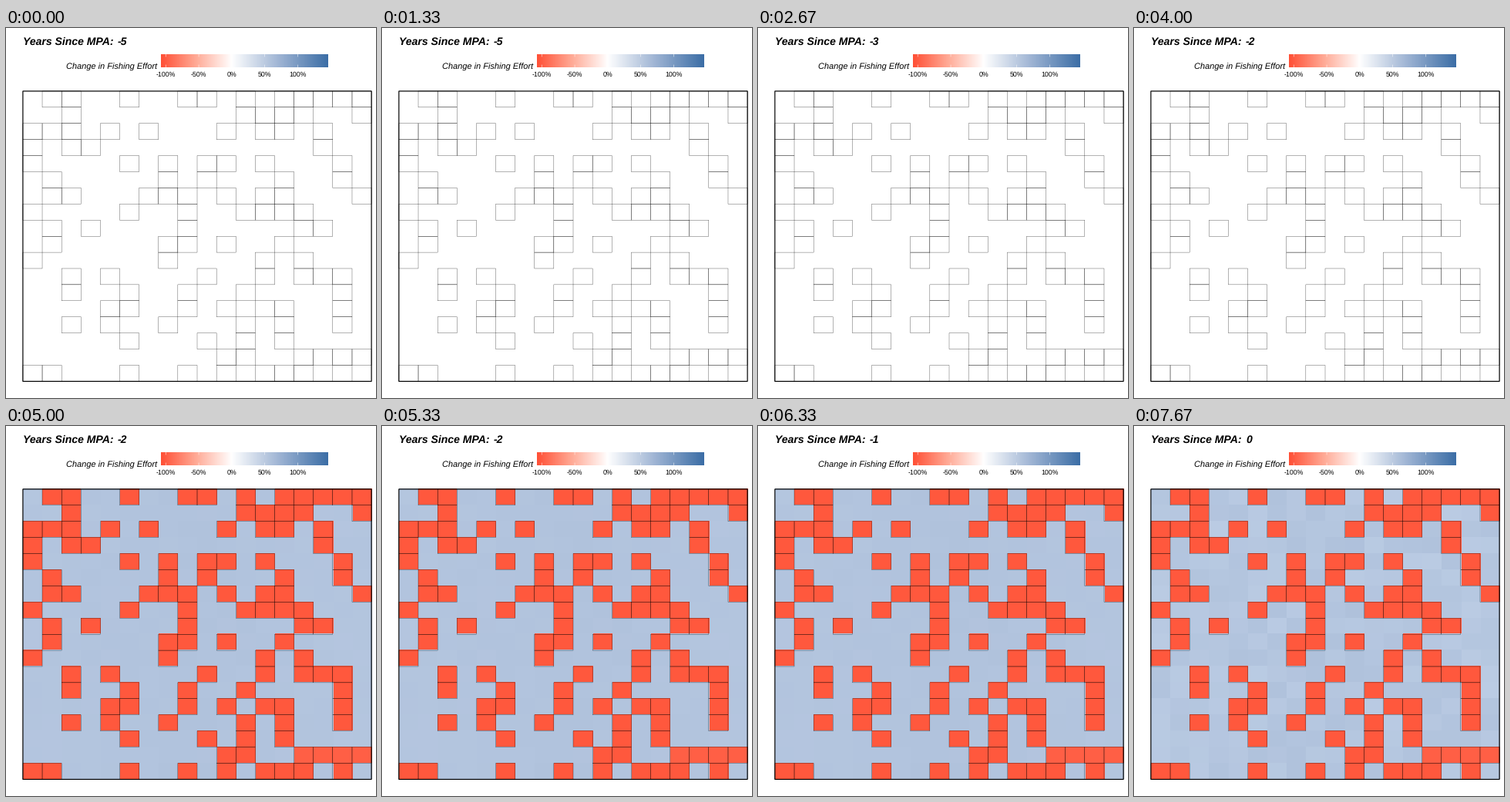
Animation of 480 by 480 pixels, one loop 8000 ms. Source, as a matplotlib script:

```python
import matplotlib.pyplot as plt
import numpy as np
from matplotlib.animation import FuncAnimation
from matplotlib.colors import LinearSegmentedColormap
from matplotlib.patches import Rectangle

SIZE, DPI = 480, 72
N = 18
LEFT, RIGHT, TOP, BOTTOM = 21.9, 474.1, 81.9, 458.4
FRAMES = 24
CLOSURE, DRIFT = 15, 23  # steps at which the cell colours change

# Columns of the protected cells, row by row
PROTECTED = [
    (1, 2, 5, 8, 9, 11, 13, 14, 15, 16, 17),
    (2, 11, 12, 13, 14, 17),
    (0, 1, 2, 4, 6, 10, 12, 13, 15),
    (0, 2, 3, 15),
    (0, 5, 7, 9, 10, 12, 16),
    (1, 7, 9, 13, 16),
    (1, 2, 6, 7, 8, 10, 12, 13, 17),
    (0, 5, 8, 11, 12, 13, 14),
    (1, 3, 8, 14, 15),
    (1, 7, 8, 10, 13),
    (0, 7, 12, 14),
    (2, 4, 9, 12, 14, 15, 16),
    (2, 5, 8, 11, 16),
    (4, 5, 8, 10, 12, 13, 16),
    (2, 4, 7, 11, 13, 16),
    (5, 9, 11, 13),
    (10, 11, 14, 15, 16, 17),
    (0, 1, 5, 8, 10, 12, 13, 14, 16),
]

plt.rcParams.update({
    "font.family": "Liberation Sans",
    "text.hinting": "none",
    "toolbar": "None",
})


def cell_colors(noise):
    """RGB grid: red protected cells, pale blue elsewhere."""
    rows, cols = np.mgrid[0:N, 0:N]
    lift = 2.5 * np.abs(cols - 8.5) / 8.5 + noise
    rgb = np.array([177, 195, 221]) + lift[..., None] * np.array([1, 0.9, 0.7])
    rgb[mask] = (255, 88, 61)
    rgb[mask & (rows == 16) & (cols > 13)] = (255, 95, 69)
    return np.clip(rgb, 0, 255).astype(np.uint8)


mask = np.zeros((N, N), bool)
for r, cols in enumerate(PROTECTED):
    mask[r, list(cols)] = True

rng = np.random.default_rng(4)
blank = np.full((N, N, 3), 255, np.uint8)
closed = cell_colors(rng.uniform(-1, 1, (N, N)))
drifted = cell_colors(rng.uniform(-2, 8, (N, N)))

fig = plt.figure(figsize=(SIZE / DPI, SIZE / DPI), dpi=DPI, facecolor="white")
ax = fig.add_axes([0, 0, 1, 1])
ax.axis("off")

# Title and legend
ax.text(22, 22, "Years Since MPA:", size=14, weight="bold", style="italic")
year = ax.text(145, 22, "-5", size=14, weight="bold", style="italic")
ax.text(78.5, 54, "Change in Fishing Effort", size=11, style="italic")

stops = [(-107, (255, 80, 54)), (-53, (255, 172, 152)), (0, (255, 255, 255)),
         (73, (157, 179, 211)), (146, (60, 110, 166))]
effort = LinearSegmentedColormap.from_list(
    "effort", [((v + 107) / 253, np.array(c) / 255) for v, c in stops], N=512)
ax.imshow(np.linspace(0, 1, 300)[None], cmap=effort, aspect="auto",
          extent=(201.3, 417.7, 51, 34), interpolation="bilinear")
for k in range(5):
    x = 207.2 + 42.85 * k
    for y0, y1 in ((34, 37.4), (47.6, 51)):
        ax.plot([x, x], [y0, y1], color="white", lw=0.5,
                solid_capstyle="butt", snap=False)
    ax.text(x, 63, f"{50 * k - 100}%", size=8.8, ha="center")

# Grid of cells
grid = ax.imshow(blank, extent=(LEFT, RIGHT, BOTTOM, TOP), aspect="auto",
                 interpolation="nearest")
w, h = (RIGHT - LEFT) / N, (BOTTOM - TOP) / N
for r, c in np.argwhere(mask):
    ax.add_patch(Rectangle((LEFT + c * w, TOP + r * h), w, h, fill=False,
                           ec="black", lw=0.3, snap=False, zorder=3))
ax.add_patch(Rectangle((LEFT, TOP), RIGHT - LEFT, BOTTOM - TOP, fill=False,
                       ec="black", lw=1.2, snap=False, zorder=4))
ax.set(xlim=(0, SIZE), ylim=(SIZE, 0))


def update(i):
    step = sum(i >= s for s in (4, 8, 12, 16, 19))
    year.set_text(str(step - 5))
    grid.set_data(drifted if i >= DRIFT else closed if i >= CLOSURE else blank)
    return year, grid


anim = FuncAnimation(fig, update, frames=FRAMES, interval=8000 / FRAMES,
                     repeat=True, repeat_delay=0, blit=False)
plt.show()
```
